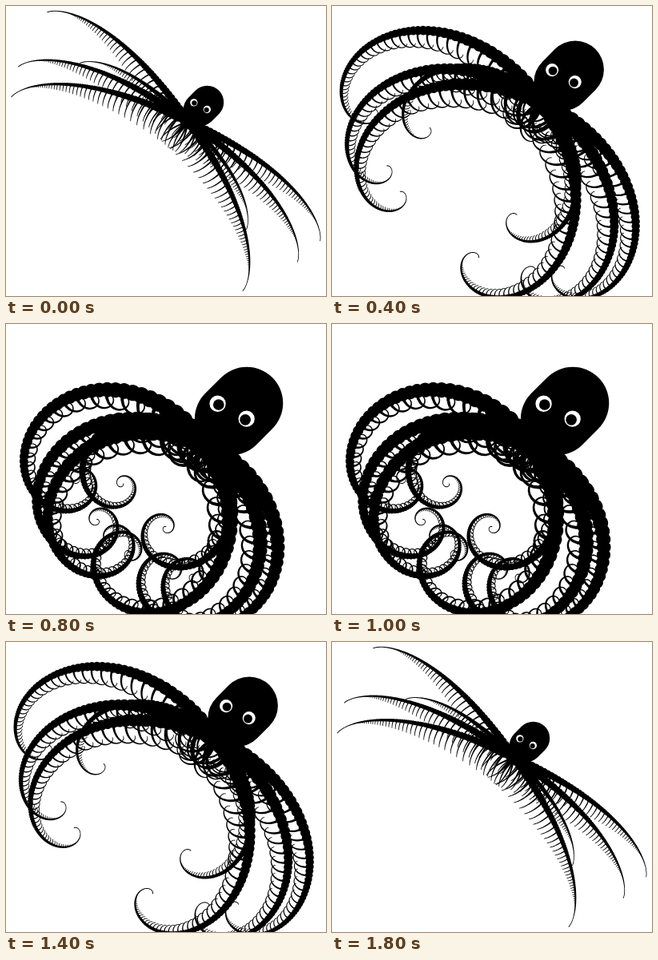
Animation, 400 px wide and 363 px high, one loop 1.9 s. Source, as an HTML page with a canvas:

```html
<!DOCTYPE html>
<html lang="en">
<head>
<meta charset="utf-8">
<title>Curling octopus</title>
<style>
  html, body { margin: 0; width: 100%; height: 100%; overflow: hidden; background: #fff; }
  canvas { display: block; width: 400px; height: 363px; }
</style>
</head>
<body>
<canvas id="stage"></canvas>
<script>
const W = 400, H = 363, STEP = 100, STEPS = 19;
const RAD = Math.PI / 180;
const SHRINK = 0.973, GIRTH = 0.0248, FINEST = 0.3;
const SUCKER = 0.2, SUCKER_ANGLE = 75 * RAD;
const AXIS = 135, SPREAD = 71.6;

// Head centre for each pose, from stretched to fully curled
const HEAD = [
  [251.5, 120.5], [271, 101], [286.5, 85], [298, 79], [304, 79.5],
  [307.5, 85.5], [308, 92], [305.5, 96.5], [301, 99], [298.5, 101]
];

// Side of the curl, slot in the fan, relative length
const ARMS = [
  [1, 2, 0.694], [-1, 2, 0.694],
  [1, 4, 1], [1, 3, 1], [1, 1, 1],
  [-1, 3, 1], [-1, 1, 1], [-1, 0, 1]
];

const canvas = document.getElementById('stage');
const ctx = canvas.getContext('2d');
const dpr = window.devicePixelRatio || 1;
canvas.width = Math.round(W * dpr);
canvas.height = Math.round(H * dpr);

// Point on a logarithmic spiral where the remaining size is f
function spiral(curl, length, f) {
  const psi = Math.atan(curl), turn = -curl * Math.log(f);
  const c = length * Math.cos(psi);
  return {
    x: c * (Math.cos(psi) - f * Math.cos(psi + turn)),
    y: c * (Math.sin(psi) - f * Math.sin(psi + turn)),
    dir: turn
  };
}

// Remaining size at which a limb gets too thin to go on
const tipSize = length => FINEST / (2 * GIRTH * length);

function dot(path, x, y, r) {
  path.moveTo(x + r, y);
  path.arc(x, y, r, 0, 2 * Math.PI);
}

function drawSucker(curl, length) {
  const end = tipSize(length), n = 30, back = [];
  if (end >= 1) return;
  ctx.beginPath();
  for (let i = 0; i <= n; i++) {
    const f = Math.pow(end, i / n), p = spiral(curl, length, f);
    const w = GIRTH * f * length + 0.2;
    const dx = -Math.sin(p.dir) * w, dy = Math.cos(p.dir) * w;
    ctx.lineTo(p.x + dx, p.y + dy);
    back.push([p.x - dx, p.y - dy]);
  }
  back.reverse().forEach(q => ctx.lineTo(q[0], q[1]));
  ctx.fill();
}

function drawArm(curl, length) {
  const beads = new Path2D(), end = tipSize(length);
  for (let j = 0, f = 1; f > end; j++, f *= SHRINK) {
    const p = spiral(curl, length, f);
    dot(beads, p.x, p.y, Math.max(GIRTH * f * length, 0.45));
    if (j % 2 === 0) {
      ctx.save();
      ctx.translate(p.x, p.y);
      ctx.rotate(p.dir + SUCKER_ANGLE);
      drawSucker(curl, SUCKER * f * length);
      ctx.restore();
    }
  }
  ctx.fill(beads);
}

function disc(x, y, r, color) {
  const path = new Path2D();
  dot(path, x, y, r);
  ctx.fillStyle = color;
  ctx.fill(path);
}

function drawEye(x, y, look) {
  disc(x, y, 0.092, '#fff');
  disc(x + look, y + 0.011, 0.062, '#000');
}

function drawHead(x, y, s) {
  ctx.save();
  ctx.translate(x, y);
  ctx.scale(s, s);
  ctx.lineCap = 'round';
  ctx.lineWidth = 0.82;
  ctx.strokeStyle = '#000';
  ctx.beginPath();
  ctx.moveTo(0, 0);
  ctx.lineTo(-0.18, 0.18);
  ctx.stroke();
  drawEye(-0.33, 0.007, 0.011);
  drawEye(-0.003, 0.178, -0.014);
  ctx.restore();
}

function draw(pose) {
  const size = 50.5 + 63 * Math.sin(9 * RAD * pose);
  const curl = 0.365 + 0.33 * pose;
  const [x, y] = HEAD[pose];

  ctx.setTransform(dpr, 0, 0, dpr, 0, 0);
  ctx.fillStyle = '#fff';
  ctx.fillRect(0, 0, W, H);
  ctx.fillStyle = '#000';
  for (const [side, slot, ratio] of ARMS) {
    ctx.save();
    ctx.translate(x - 0.48 * size, y + 0.48 * size);
    ctx.rotate((AXIS - side * (SPREAD + 10 * slot)) * RAD);
    ctx.scale(1, side);
    drawArm(curl, 4.72 * size * ratio);
    ctx.restore();
  }
  drawHead(x, y, size);
}

let shown = -1;
const start = performance.now();

function tick() {
  const i = Math.floor((performance.now() - start) / STEP) % STEPS;
  const pose = Math.min(i, STEPS - 1 - i);
  if (pose !== shown) {
    draw(pose);
    shown = pose;
  }
  requestAnimationFrame(tick);
}
tick();
</script>
</body>
</html>
```
